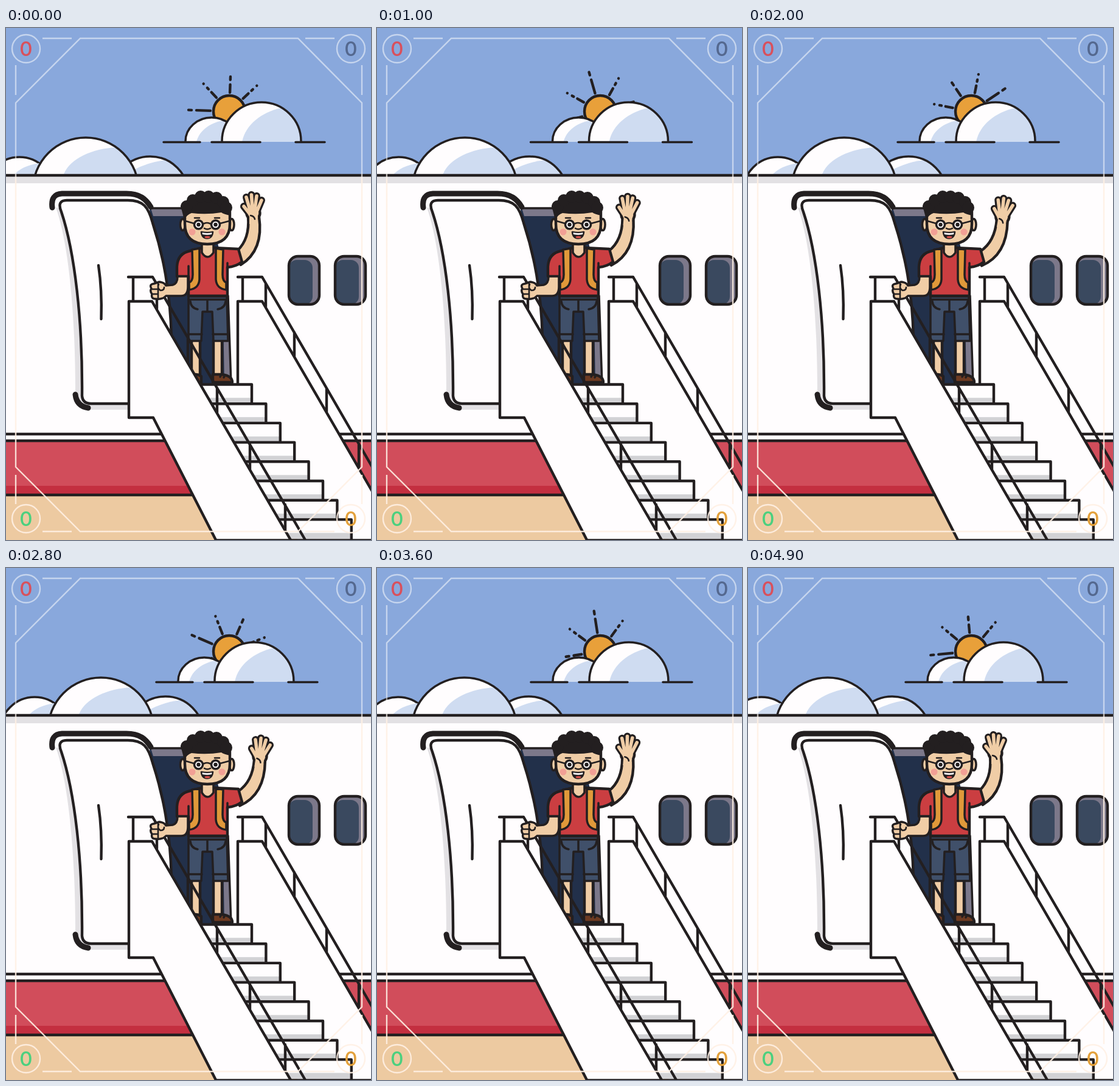
Recreate the animation shown at these times as an HTML page. Size 600 by 841 pixels, loop 5000 ms.

```html
<!DOCTYPE html>
<html lang="en">
<head>
<meta charset="utf-8">
<title>Boarding stairs</title>
<style>
html, body { margin: 0; width: 100%; height: 100%; overflow: hidden; background: #89a8dc; }
svg { display: block; width: 100vw; height: 100vh; }
.ink { stroke: #231f20; stroke-width: 4.4; stroke-linecap: round; stroke-linejoin: round; }
.line { fill: none; }
.thin { stroke-width: 3.5; }
.fine { stroke-width: 2.6; }
.white { fill: #fffdfe; }
.grey { fill: #e3e1e4; }
.shade { fill: #cfdcf1; }
.skin { fill: #f0cda6; }
.red { fill: #cb3e41; }
.denim { fill: #40506a; }
.strap { fill: #e0993a; }
.shoe { fill: #6e3b22; }
.purple { fill: #7c788a; }
.frame { fill: none; stroke: url(#frameTint); stroke-width: 2.4; }
text { font: 500 33px Inter, "Open Sans", sans-serif; text-anchor: middle; }
</style>
</head>
<body>
<svg viewBox="0 0 600 841" preserveAspectRatio="none">
  <defs>
    <linearGradient id="frameTint" gradientUnits="userSpaceOnUse" x1="0" y1="235" x2="0" y2="250">
      <stop offset="0" stop-color="#fff" stop-opacity=".52"/>
      <stop offset="1" stop-color="#fff0e4" stop-opacity=".88"/>
    </linearGradient>
    <clipPath id="aboveCloudBase"><rect width="600" height="170"/></clipPath>
    <path id="fingers" d="M401 299L395 278M405 298L403.500 274M409 298L412 276M412 302L420 283M402 307L391 293"/>
    <g id="window">
      <rect class="purple" x="465" y="375" width="50" height="79" rx="15"/>
      <rect x="465" y="381" width="39" height="73" rx="13" fill="#3a495f"/>
      <rect class="ink line" x="465" y="375" width="50" height="79" rx="15"/>
    </g>
  </defs>

  <rect width="600" height="841" fill="#89a8dc"/>

  <g clip-path="url(#aboveCloudBase)"><g id="rays" class="ink line"></g></g>
  <circle class="ink" cx="367" cy="137" r="26" fill="#e8a03a"/>

  <g id="sunCloud">
    <path class="white" d="M295 187A43 40 0 0 1 381 187Z"/>
    <path class="shade" d="M313 187C318 168 335 156 357 152L381 187Z"/>
    <path class="ink line thin" d="M295 186A43 39 0 0 1 381 186"/>
    <path class="white" d="M355 187A65 65 0 0 1 485 187Z"/>
    <path class="shade" d="M388 187C394 158 420 139 452 131A65 65 0 0 1 485 187Z"/>
    <path class="ink line thin" d="M355 186A65 64 0 0 1 485 186M259 187.500H319M338 187.500H418M476 187.500H524"/>
  </g>

  <g id="lowClouds">
    <circle class="ink white thin" cx="22" cy="269" r="57"/>
    <path class="shade" d="M14 240Q28 226 54 222V240Z"/>
    <circle class="white" cx="237" cy="274" r="63"/>
    <path class="shade" d="M210 233Q235 220 262 217A63 63 0 0 1 290 240H210Z"/>
    <circle class="ink line thin" cx="237" cy="274" r="63"/>
    <circle class="white" cx="131" cy="267" r="87"/>
    <path class="shade" d="M95 240C105 214 143 198 181 196A87 87 0 0 1 214 240Z"/>
    <circle class="ink line thin" cx="131" cy="267" r="87"/>
  </g>

  <!-- fuselage -->
  <rect class="white" y="242" width="600" height="440"/>
  <rect class="grey" y="244" width="600" height="11"/>
  <rect y="680" width="600" height="73" fill="#d14d5b"/>
  <rect y="752" width="600" height="15" fill="#c42f40"/>
  <rect y="767" width="600" height="74" fill="#edcaa1"/>
  <path class="ink line" d="M-5 242H605M-5 667H605M-5 678H605M-5 767H605"/>
  <use href="#window"/>
  <use href="#window" x="76"/>

  <!-- doorway and door -->
  <path d="M236 296H330C346 340 364 410 366 450L369 585H250Z" fill="#22304a"/>
  <path class="purple" d="M238 296H330V309H242ZM357 470H366L369 585H359Z"/>
  <path class="ink line thin" d="M238 296H320M365 440L370 585"/>
  <path class="grey" d="M82 295C100 345 114 450 114 600Q118 626 138 627H204V610H130L112 400L92 296Z"/>
  <path class="ink white" d="M202 617H140Q126 617 125 604C126 480 113 368 91 302Q83 283 100 283H200C226 283 234 294 241 320C258 372 270 430 272 510L290 617Z"/>
  <path class="ink line" style="stroke-width:9" d="M76 295Q73 273 92 272H198C220 272 230 281 238 294M114 602Q116 621 135 624"/>
  <path class="ink line" d="M152 390Q158 430 156.500 478"/>

  <!-- far side of the stairs -->
  <path class="white" d="M381 449H421L600 758V841H480L330 585H381Z"/>
  <path class="ink line" d="M381 585V449H421L602 761M381 409H421L602 721M389 409V447M427 420V458M474 500V540M527 592V631M580 683V723"/>

  <!-- traveller -->
  <g class="ink">
    <path class="skin" d="M305 512H319V574H305ZM341 512H355V574H341Z"/>
    <path class="shoe" d="M302 582V572Q312 566 321 572V582ZM340 582V569H354Q372 571 372 582Z"/>
    <path class="line thin" d="M354 569L352 573M360 570L358 574"/>
    <path class="denim thin" d="M300 441H363L365 514H341L339 466H323L321 514H300Z"/>
    <path class="line thin" d="M300 446H364M331 447V465M303 449Q304 460 315 462M361 449Q360 460 348 462M300 503H322M340 503H365"/>
    <g id="arm">
      <path class="skin" d="M380 366C393 354 400 335 398 310H416C421 345 413 372 386 389Z"/>
      <use href="#fingers" style="stroke-width:12"/>
      <circle class="skin" cx="406.500" cy="304" r="11"/>
      <use href="#fingers" style="stroke:#f0cda6;stroke-width:5.500"/>
      <path class="skin" style="stroke:none" d="M400 300H414V322H400Z"/>
      <path class="line fine" d="M402 308Q408 309 409 314"/>
    </g>
    <path class="red" d="M322 361L303 366Q282 370 281 392V408H300V440H364V393Q378 392 388 384L382 363L341 361Z"/>
    <path class="line thin" d="M300 408V391M364 393V386"/>
    <path class="strap thin" d="M306 364L318 362V413Q317 428 301 430V418Q307 416 307 405ZM357 364L345 362V413Q346 428 362 430V418Q356 416 356 405Z"/>
    <path class="skin thin" d="M322 352V369Q331 383 341 369V352Z"/>
    <ellipse class="skin thin" cx="290.500" cy="323" rx="4" ry="9.500"/>
    <ellipse class="skin thin" cx="371" cy="323" rx="4" ry="9.500"/>
    <path class="skin" d="M294 300V322C294 346 309 355 331 355S368 346 368 322V300Z"/>
  </g>
  <g id="hair" fill="#231f20">
    <path d="M287 292Q310 268 350 274L371 292L369 308Q358 306 354 303Q330 307 305 304Q298 306 293 315Z"/>
  </g>
  <g fill="#f2a095"><circle cx="306" cy="335" r="5.500"/><circle cx="355" cy="335" r="5.500"/></g>
  <g class="ink">
    <path class="line fine" d="M295 317L309 321M367 317L352 321M324 322Q330 318 337 322M310 312H318M343 312H351M326 329Q331 332 336 329"/>
    <circle class="white thin" cx="316.500" cy="323" r="7"/>
    <circle class="white thin" cx="344.500" cy="323" r="7"/>
    <path class="fine" fill="#231f20" d="M321 335Q331 337 340 335Q339 345.500 330.500 345.500T321 335Z"/>
  </g>
  <circle cx="316.500" cy="323" r="3.200" fill="#231f20"/>
  <circle cx="344.500" cy="323" r="3.200" fill="#231f20"/>
  <path class="white" d="M322.500 336Q331 338 338.500 336L338 339Q331 340.500 323 339Z"/>
  <ellipse cx="331" cy="343.500" rx="4.500" ry="1.800" fill="#d8504c"/>

  <g id="steps"></g>

  <!-- near side of the stairs -->
  <path class="ink white" d="M202 449H240L468 841L480 861H355L345 841L242 640H202Z"/>
  <path class="ink line" d="M201 409H241L492 841L497 850M209 409V447M248 421V461M299 509V549M347 592V632M401 684V725M459 783V824"/>
  <path class="ink line thin" d="M345 841H600"/>
  <g class="ink thin">
    <path class="skin" d="M299 408V425Q299 440 288 440H263Q258 446 246 445Q238 445 240 437Q236 432 239 428Q235 421 243 420L252 417Q260 418 263 423L274 422Q282 420 282 408Z"/>
    <path class="line fine" d="M240 429H250M240 437H250M250 420V445M251 421Q248 428 254 431Q260 431 260 426"/>
  </g>

  <g class="frame">
    <path d="M122 17H480L585 123V721L480 827H122L16 721V123Z"/>
    <path d="M60 17H108M492 17H540M60 827H108M492 827H540M16 61V110M585 61V110M16 734V782M585 734V782"/>
    <circle cx="33" cy="34" r="23"/><circle cx="567" cy="34" r="23"/>
    <circle cx="33" cy="806" r="23"/><circle cx="567" cy="806" r="23"/>
  </g>
  <text x="33" y="46" fill="#d9505c">0</text>
  <text x="567" y="46" fill="#54688f">0</text>
  <text x="33" y="818" fill="#4bd07f">0</text>
  <text x="567" y="818" fill="#e3a13c">0</text>
</svg>
<script>
const $ = id => document.getElementById(id);
const range = n => [...Array(n).keys()];

$("hair").innerHTML += [[297, 293], [307, 283], [320, 277], [333, 277], [346, 279], [357, 286], [362, 295]]
  .map(([x, y]) => `<circle cx="${x}" cy="${y}" r="10"/>`).join("");

// Upright rays are shortest; diagonal ones end in a dash and a dot.
$("rays").innerHTML = range(8).map(i => {
  const tip = 137 - 62 + 5 * Math.cos(i * Math.PI / 2);
  const d = i % 2
    ? `V${tip + 19}M367 ${tip + 12}V${tip + 9}M367 ${tip}v.1`
    : `V${tip + 13}M367 ${tip + 5}V${tip}`;
  return `<path transform="rotate(${i * 45} 367 137)" d="M367 106${d}"/>`;
}).join("");

$("steps").innerHTML = range(8).map(i => {
  const y = 585.5 + i * 31.7, x = 404 + i * 23.4, left = 311 + i * 18.5;
  return `<rect class="white" x="${left}" y="${y}" width="${x - left}" height="31.7"/>
    <rect x="${left}" y="${y + 22}" width="${x - left}" height="9.7" fill="#d2d2d5"/>
    <path class="ink line" d="M${left + 10} ${y}H${x}V${y + 31.7}"/>`;
}).join("");

const ease = u => (1 - Math.cos(Math.PI * Math.min(u, 1))) / 2;
const sway = t => t < 2.4 ? ease(t / 2) : 1 - ease((t - 2.4) / 2.3);
const move = (id, value) => $(id).setAttribute("transform", value);

function draw(now) {
  const t = Math.floor(now % 5000 / 100) / 10;
  const p = sway(t);
  move("rays", `rotate(${2 + 72 * t} 367 137)`);
  move("sunCloud", `translate(${-13 * p} 0)`);
  move("lowClouds", `translate(${27 * p} 0)`);
  move("arm", `rotate(${9.5 * p} 376 378)`);
  requestAnimationFrame(draw);
}
draw(performance.now());
</script>
</body>
</html>
```
